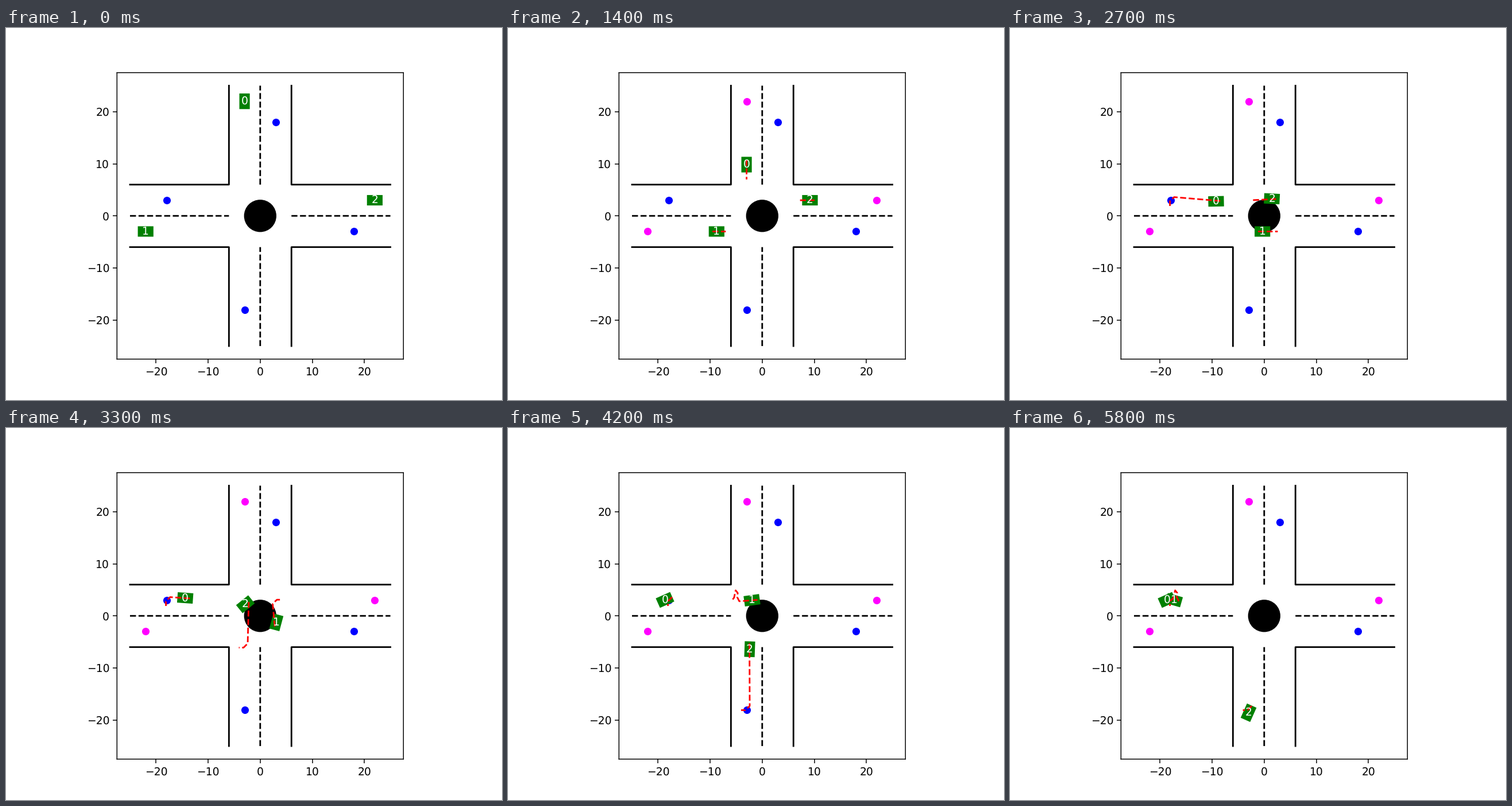
Recreate the animation shown at these times as a matplotlib script. Size 864 by 648 pixels, loop 5.9 s.

```python
import numpy as np
import matplotlib.pyplot as plt
from matplotlib.animation import FuncAnimation

plt.rcParams.update({"path.snap": False, "text.hinting": "none"})

FRAMES, STEP_MS = 59, 100
LENGTH, WIDTH = 3, 2
HALF, END = 6, 25

# Planned path near a goal, as (forward, right) offsets from it.
STOP = np.array([(-0.4, 0)])
HOOK = np.array([(-0.7, -0.6), (-0.3, -0.2), (0.1, 0.2), (0.1, 1.1)])
MIRROR = HOOK * (1, -1)
LOOP = np.array([(-1.6, -0.2), (-1.2, 0.6), (-1.3, 1.4), (-0.9, 1.9),
                 (-0.6, 0.5), (-0.3, 0.1)])

# keys: frame, x, y, heading, speed.  goals: first frame, x, y, path shape.
CARS = [
    dict(keys=[(0, -3, 22, 270, 0.37), (14, -3, 9.84, 270, 0.9),
               (22, -5.5, 4.7, 232, 1.1), (33, -14.4, 3.44, 176, 0.9),
               (39, -18.66, 3.06, 204, 0.1)],
         goals=[(0, -3, 6.6, STOP), (18, -6, 3, STOP), (25, -18, 3, MIRROR)]),
    dict(keys=[(0, -22, -3, 0, 0.68), (14, -8.76, -3, 0, 0.75),
               (22, -4.77, -3, 0, 1), (28, 0.5, -3, 0, 0.85),
               (33, 3.1, -1.24, 75, 1), (42, -1.96, 3, 188, 1.1),
               (50, -9.4, 3.4, 184, 1), (58, -17.33, 3.02, 164, 1)],
         goals=[(0, -6.6, -3, STOP), (19, 3, -3, STOP), (30, 3, 3, HOOK),
                (37, -6, 3, LOOP), (45, -18, 3, LOOP)]),
    dict(keys=[(0, 22, 3, 180, 0.54), (14, 9.17, 3, 180, 0.85),
               (22, 5.75, 3, 180, 0.9), (33, -2.84, 2.23, 219, 0.8),
               (42, -2.4, -6.4, 268, 1.1), (58, -3, -18.6, 246, 0.3)],
         goals=[(0, 6.6, 3, STOP), (19, -3, 3, STOP), (31, -3, -6, HOOK),
                (41, -3, -18, HOOK)]),
]


def unit(angle):
    return np.array([np.cos(angle), np.sin(angle)])


def pose(car, t):
    """Position and heading on a cubic Hermite curve through the keys."""
    keys = car["keys"]
    i = max(j for j in range(len(keys) - 1) if keys[j][0] <= t)
    (t0, x0, y0, a0, v0), (t1, x1, y1, a1, v1) = keys[i:i + 2]
    h = t1 - t0
    s = min((t - t0) / h, 1)
    start, step = np.array([x0, y0]), np.array([x1 - x0, y1 - y0])
    m0, m1 = h * v0 * unit(np.radians(a0)), h * v1 * unit(np.radians(a1))
    pos = (start + step * s * s * (3 - 2 * s)
           + m0 * s * (1 - s) ** 2 - m1 * s * s * (1 - s))
    vel = (step * 6 * s * (1 - s)
           + m0 * (1 - s) * (1 - 3 * s) + m1 * s * (3 * s - 2))
    return pos, np.arctan2(vel[1], vel[0])


def corners(pos, angle):
    box = np.array([(-1, -1), (1, -1), (1, 1), (-1, 1)]) * (LENGTH / 2, WIDTH / 2)
    return box @ np.array([unit(angle), unit(angle + np.pi / 2)]) + pos


def clip(pts, limit):
    """Cut a polyline at a given arc length."""
    arc = np.r_[0, np.cumsum(np.hypot(*np.diff(pts, axis=0).T))]
    stops = np.r_[arc[arc < limit], min(limit, arc[-1])]
    return np.column_stack([np.interp(stops, arc, col) for col in pts.T])


def planned(car, t):
    """Path from the previous pose to the current goal."""
    if t == 0:
        return np.empty((0, 2))
    goals = car["goals"]
    i = max(j for j, goal in enumerate(goals) if goal[0] <= t)
    goal, shape = np.array(goals[i][1:3]), goals[i][3]
    before = np.array(goals[i - 1][1:3] if i else car["keys"][0][1:3])
    ahead = (goal - before) / np.hypot(*(goal - before))
    tail = goal + shape @ np.array([ahead, (ahead[1], -ahead[0])])

    pos, angle = pose(car, t - 1)
    if len(tail) > 1 and np.hypot(*(goal - pos)) < 2:
        return tail
    while len(tail) > 1 and (tail[0] - pos) @ unit(angle) < 0.1:
        tail = tail[1:]
    return clip(np.vstack([pos, tail]), min(14, 8 + t))


fig, ax = plt.subplots(figsize=(6.4, 4.8), dpi=135)
ax.set_aspect("equal")
ax.set(xlim=(-27.5, 27.5), ylim=(-27.5, 27.5))
ax.set_xticks(range(-20, 21, 10))
ax.set_yticks(range(-20, 21, 10))

for sx in (-1, 1):
    for sy in (-1, 1):
        ax.plot([sx * HALF, sx * HALF, sx * END],
                [sy * END, sy * HALF, sy * HALF], "k")
for span in ((-END, -HALF), (HALF, END)):
    ax.plot(span, (0, 0), "k--")
    ax.plot((0, 0), span, "k--")
ax.add_patch(plt.Circle((0, 0), 3, color="k"))

ax.plot([3, 18, -18, -3], [18, -3, 3, -18], "bo")
ax.plot([-3, -22, 22], [22, -3, 3], "o", color="magenta")

bodies, trails, labels = [], [], []
for i in range(len(CARS)):
    body = plt.Polygon(np.zeros((4, 2)), facecolor="g", lw=0, zorder=3)
    bodies.append(ax.add_patch(body))
    trails += ax.plot([], [], "r--", zorder=4)
    labels.append(ax.text(0, 0, str(i), color="w", ha="center", va="center",
                          zorder=5))


def update(t):
    for car, body, trail, label in zip(CARS, bodies, trails, labels):
        pos, angle = pose(car, t)
        body.set_xy(corners(pos, angle))
        trail.set_data(*planned(car, t).T)
        label.set_position(pos)
    return bodies + trails + labels


anim = FuncAnimation(fig, update, frames=FRAMES, interval=STEP_MS,
                     repeat=True, repeat_delay=0)
plt.show()
```
